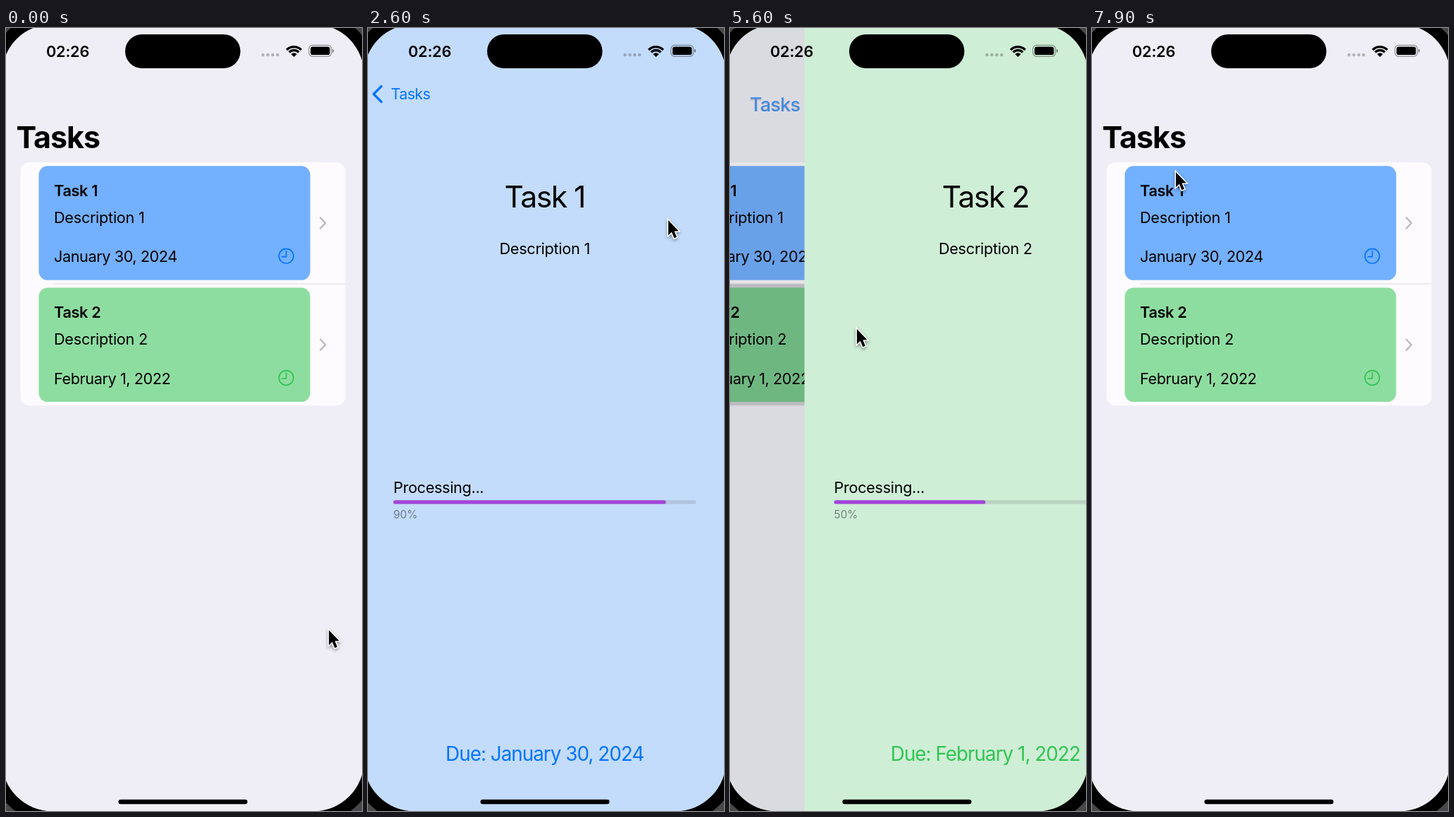
An HTML page with a canvas for the animation above (8000 ms loop, 505x1108 px).

```html
<!DOCTYPE html>
<html lang="en">
<head>
<meta charset="utf-8">
<title>Tasks</title>
<style>
html, body { margin: 0; width: 100%; height: 100%; overflow: hidden; background: #000; }
canvas { display: block; width: 505px; height: 1108px; }
</style>
</head>
<body>
<canvas id="stage" width="505" height="1108"></canvas>
<script>
const W = 505, H = 1108, LOOP = 8000, STEP = 100;
const PT = 514 / 393; // pixels per point on the phone
const MID = 250.7, LEFT = -6, WIDE = 514, ROW = 172.3, LIST_TOP = 190;
const BODY = 21.7, MOVE = 900;
const FONT = 'Inter, "Liberation Sans", sans-serif';
const BLUE = '#0474ff', GREEN = '#30c553';
const ctx = document.getElementById('stage').getContext('2d');

const tasks = [
  { name: 'Task 1', note: 'Description 1', due: 'January 30, 2024', done: 0.9,
    tint: BLUE, card: 'rgba(3,116,255,.55)', page: '#c3dcfb', open: 1800, close: 4300 },
  { name: 'Task 2', note: 'Description 2', due: 'February 1, 2022', done: 0.5,
    tint: GREEN, card: 'rgba(52,197,85,.55)', page: '#cfeed6', open: 5394, close: 7087 }
];

// arrival time and place of the pointer tip
const stops = [
  { at: 0, x: 457, y: 850 },
  { at: 1550, x: 346, y: 296 },
  { at: 2600, x: 425, y: 270 },
  { at: 3300, x: 318, y: 344 },
  { at: 4400, x: 41, y: 97 },
  { at: 4900, x: 136, y: 284 },
  { at: 5600, x: 179, y: 424 },
  { at: 6500, x: 230, y: 380 },
  { at: 7200, x: 41, y: 100 },
  { at: 7900, x: 118, y: 202 }
];

const clamp = v => Math.max(0, Math.min(1, v));
const mix = (a, b, k) => a + (b - a) * k;

// critically damped spring
function spring(ms) {
  if (ms <= 0) return 0;
  if (ms > 600) return 1;
  const u = ms * 0.014;
  return 1 - (1 + u) * Math.exp(-u);
}

function pointerAt(t) {
  const next = stops.findIndex(s => s.at > t);
  if (next < 0) return stops[stops.length - 1];
  const a = stops[next - 1], b = stops[next];
  const start = Math.max(a.at, b.at - MOVE);
  const k = clamp((t - start) / (b.at - start));
  const e = k * k * (3 - 2 * k);
  return { x: mix(a.x, b.x, e), y: mix(a.y, b.y, e) };
}

function box(x, y, w, h, r, fill) {
  ctx.beginPath();
  ctx.roundRect(x, y, w, h, r);
  ctx.fillStyle = fill;
  ctx.fill();
}

function elbow(x, y, dx, dy, width, color) {
  ctx.beginPath();
  ctx.moveTo(x - dx, y - dy);
  ctx.lineTo(x, y);
  ctx.lineTo(x - dx, y + dy);
  ctx.lineWidth = width;
  ctx.strokeStyle = color;
  ctx.lineCap = ctx.lineJoin = 'round';
  ctx.stroke();
}

function text(s, x, y, size, { weight = 400, color = '#000', align = 'left', track = -0.016 } = {}) {
  ctx.font = `${weight} ${size}px ${FONT}`;
  ctx.letterSpacing = `${track * size}px`;
  ctx.textAlign = align;
  ctx.fillStyle = color;
  ctx.fillText(s, x, y);
}

function clock(x, y, color) {
  ctx.beginPath();
  ctx.arc(x, y, 10.3, 0, Math.PI * 2);
  ctx.moveTo(x, y - 7);
  ctx.lineTo(x, y + 1);
  ctx.lineTo(x - 6, y + 1);
  ctx.lineWidth = 1.7;
  ctx.lineCap = ctx.lineJoin = 'round';
  ctx.strokeStyle = color;
  ctx.stroke();
}

function drawRow(task, y, glow) {
  ctx.fillStyle = `rgba(205,205,212,${glow})`;
  ctx.fillRect(20, y, 462, ROW);
  box(46.5, y + 5.3, 385, 161.5, 12.5, task.card);
  text(task.name, 68, y + 47.8, BODY, { weight: 600 });
  text(task.note, 68, y + 85.6, BODY, { track: -0.013 });
  text(task.due, 68, y + 141.3, BODY, { track: -0.02 });
  clock(397.5, y + 132.7, task.tint);
  elbow(453, y + 86, 7, 7.5, 2.4, '#b9b8bd');
}

function drawList(p, lit, glow) {
  ctx.fillStyle = '#efeef6';
  ctx.fillRect(0, 0, W, H);
  ctx.save();
  ctx.translate(-0.3 * WIDE * p, 0);
  ctx.beginPath();
  ctx.roundRect(20.5, LIST_TOP, 461, ROW * 2, 13);
  ctx.clip();
  ctx.fillStyle = '#fdfbfe';
  ctx.fillRect(20, LIST_TOP, 462, ROW * 2);
  ctx.fillStyle = '#dddce0';
  ctx.fillRect(68, LIST_TOP + ROW - 0.8, 414, 1);
  tasks.forEach((task, i) => drawRow(task, LIST_TOP + i * ROW, task === lit ? glow : 0));
  ctx.restore();
  ctx.fillStyle = `rgba(0,0,0,${0.108 * p})`;
  ctx.fillRect(0, 0, W, H);
}

function drawPage(task, p) {
  const display = { align: 'center', track: -0.035 };
  ctx.save();
  ctx.translate(WIDE * (1 - p), 0);
  ctx.fillStyle = task.page;
  ctx.fillRect(LEFT, 0, WIDE, H);
  text(task.name, MID, 254, 42.6, display);
  text(task.note, MID, 320, BODY, { align: 'center', track: -0.013 });
  text('Processing...', 36, 658, BODY);
  box(36, 668.3, 429.5, 5.2, 2.6, 'rgba(120,120,128,.24)');
  box(36, 668.3, 429.5 * task.done, 5.2, 2.6, '#a145d9');
  text(`${task.done * 100}%`, 36, 693.7, 15.3, { color: 'rgba(60,60,67,.6)', track: 0 });
  text('Due: ' + task.due, MID, 1036.5, 27.8, { ...display, color: task.tint });
  ctx.restore();
}

// The large title shrinks into the label of the back button.
function drawTitle(k) {
  const x = mix(14.5, 32.5, k), mid = mix(154, 93.3, k), w = mix(116, 55, k);
  const big = 43 * w / 116, small = 21.4 * w / 55;
  ctx.globalAlpha = (1 - k) ** 1.2;
  text('Tasks', x, mid + big * 0.364, big, { weight: 700, track: -0.024 });
  ctx.globalAlpha = k ** 1.3;
  text('Tasks', x, mid + small * 0.364, small, { color: BLUE, track: -0.026 });
  ctx.globalAlpha = clamp((k - 0.82) / 0.18);
  elbow(8, 93.5, -11, 11, 3.2, BLUE);
  ctx.globalAlpha = 1;
}

function drawWifi(x, y) {
  const from = -Math.PI * 0.755, to = -Math.PI * 0.245;
  ctx.lineCap = 'butt';
  ctx.lineWidth = 3.3;
  ctx.strokeStyle = '#000';
  for (const r of [9.5, 14.4]) {
    ctx.beginPath();
    ctx.arc(x, y, r, from, to);
    ctx.stroke();
  }
  ctx.beginPath();
  ctx.moveTo(x, y);
  ctx.arc(x, y, 5.8, from, to);
  ctx.fillStyle = '#000';
  ctx.fill();
}

function drawStatus() {
  text('02:26', 57, 40.8, BODY, { weight: 600, track: -0.01 });
  for (let i = 0; i < 4; i++) box(362.3 + i * 6.9, 35.8, 4.5, 4.5, 2.25, 'rgba(0,0,0,.25)');
  drawWifi(408.5, 41);
  ctx.beginPath();
  ctx.roundRect(429.8, 24.4, 31.8, 15.8, 5);
  ctx.lineWidth = 1.3;
  ctx.strokeStyle = 'rgba(0,0,0,.4)';
  ctx.stroke();
  box(432, 26.5, 27.4, 11.6, 3.2, '#000');
  box(463, 29.8, 2, 5, [0, 2, 2, 0], 'rgba(0,0,0,.45)');
  box(169, 9, 163.5, 48, 24, '#000');
  box(159.5, 1091.7, 183, 6.6, 3.3, '#000');
}

// Fills everything outside the screen, grown by some pixels.
function bezel(grow, fill) {
  ctx.beginPath();
  ctx.rect(-60, -60, W + 120, H + 120);
  ctx.roundRect(LEFT - grow, -5.5 - grow, WIDE + grow * 2, 852 * PT - 0.4 + grow * 2, 55 * PT + grow);
  ctx.fillStyle = fill;
  ctx.fill('evenodd');
}

const arrow = new Path2D('M1 2V23.2L5.8 18.8 9.4 27.2 13 25.7 9.4 17.5 15.6 17.2Z');

function drawPointer({ x, y }) {
  ctx.save();
  ctx.translate(x, y);
  ctx.lineJoin = 'miter';
  ctx.lineWidth = 3;
  ctx.strokeStyle = '#fff';
  ctx.shadowColor = 'rgba(0,0,0,.4)';
  ctx.shadowBlur = 4;
  ctx.shadowOffsetY = 2;
  ctx.stroke(arrow);
  ctx.shadowColor = 'transparent';
  ctx.fillStyle = '#000';
  ctx.fill(arrow);
  ctx.restore();
}

function draw(t) {
  const lit = tasks.find(v => t >= v.open - 90 && t < v.close + 650);
  const progress = time => lit ? spring(time - lit.open) - spring(time - lit.close) : 0;
  const p = progress(t);
  const glow = lit ? clamp(1 - (t - lit.close) / 350) : 0;
  drawList(p, lit, glow);
  if (p > 0) drawPage(lit, p);
  drawTitle(clamp(progress(t - 12)));
  drawStatus();
  bezel(0, '#000');
  bezel(17, '#48484b');
  drawPointer(pointerAt(t));
}

function tick() {
  const now = performance.now() + 8;
  draw(Math.floor(now / STEP) * STEP % LOOP);
  requestAnimationFrame(tick);
}
tick();
</script>
</body>
</html>
```
